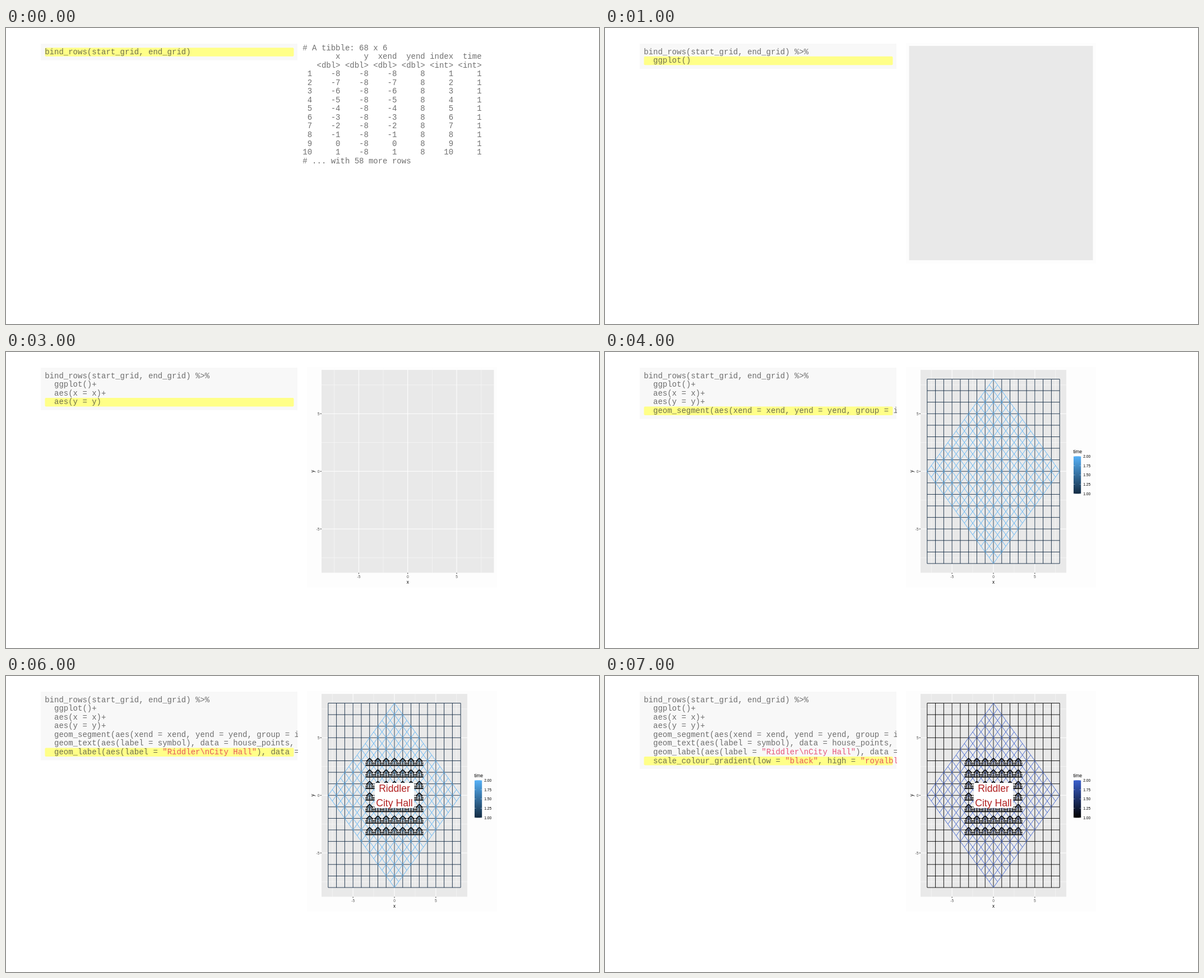
An HTML page that plays this animation: 1058 px wide and 529 px high, repeating every 8000 ms.

```html
<!DOCTYPE html>
<html lang="en">
<head>
<meta charset="utf-8">
<title>Building a plot step by step</title>
<style>
html, body { margin: 0; width: 100%; height: 100%; overflow: hidden; background: #fff; }
svg { display: block; width: 1058px; height: 529px; }
text { font-family: "Liberation Sans", Arial, sans-serif; font-size: 6.7px; fill: #4d4d4d; }
.mono { font: 14px "Liberation Mono", "Courier New", monospace; fill: #333; fill-opacity: .7; white-space: pre; }
.str { fill: #d14; }
.title { font-size: 8.2px; fill: #000; }
.key { fill: #000; }
.hall { font-size: 17.6px; fill: #b22222; }
.mid { text-anchor: middle; }
.end { text-anchor: end; }
</style>
</head>
<body>
<svg id="stage" viewBox="0 0 1058 529"></svg>
<script>
const STEP = 1000, STEPS = 8, ROW = 15.53;
const TOP = 32, BOTTOM = 394.5, RIGHT = 870.5;
const code = [
  'bind_rows(start_grid, end_grid)',
  '  ggplot()',
  '  aes(x = x)',
  '  aes(y = y)',
  '  geom_segment(aes(xend = xend, yend = yend, group = i',
  '  geom_text(aes(label = symbol), data = house_points,',
  '  geom_label(aes(label = "Riddler\\nCity Hall"), data =',
  '  scale_colour_gradient(low = "black", high = "royalbl'
];

const range = (a, b, by = 1) => Array.from({ length: Math.round((b - a) / by) + 1 }, (_, i) => a + i * by);
const escape = s => s.replace(/&/g, '&amp;').replace(/</g, '&lt;').replace(/>/g, '&gt;');
const text = (x, y, cls, s, more = '') => `<text x="${x}" y="${y}" class="${cls}" ${more}>${s}</text>`;
const rect = (x, y, w, h, fill, r = 0) =>
  `<rect x="${x}" y="${y}" width="${w}" height="${h}" fill="${fill}" rx="${r}"/>`;
const lines = (d, color, width) => `<path d="${d}" fill="none" stroke="${color}" stroke-width="${width}"/>`;
const seg = (x1, y1, x2, y2) => `M${x1} ${y1}L${x2} ${y2}`;

function codePanel(step) {
  const rows = code.slice(0, step + 1).map((line, i) => {
    const tail = i === step || i > 3 ? '' : i ? '+' : ' %>%';
    const body = escape(line + tail).replace(/"[^"]*"?/g, '<tspan class="str">$&</tspan>');
    return text(69.2, 46.8 + i * ROW, 'mono', body);
  });
  return rect(62, 28, 458, 14 + (step + 1) * ROW, '#f8f8f8') +
    rect(69.5, 35.3 + step * ROW, 444, ROW, '#ffff88', 2) +
    `<g clip-path="url(#codeClip)">${rows.join('')}</g>`;
}

function table() {
  const row = (n, cells) => String(n).padStart(2) + cells.map(c => ' ' + String(c).padStart(5)).join('');
  const d = '<dbl>', n = '<int>';
  return [
    '# A tibble: 68 x 6',
    row('', ['x', 'y', 'xend', 'yend', 'index', 'time']),
    row('', [d, d, d, d, n, n]),
    ...range(1, 10).map(i => row(i, [i - 9, -8, i - 9, 8, i, 1])),
    '# ... with 58 more rows'
  ].map((s, i) => text(529.3, 39.7 + i * ROW, 'mono', escape(s))).join('');
}

// Panel with gridlines and axes; returns its scales too
function panel(left, right, hasY) {
  const ux = (right - left) / 17.6, uy = (BOTTOM - TOP) / 17.6;
  const cx = (left + right) / 2, cy = (TOP + BOTTOM) / 2;
  const X = v => cx + v * ux, Y = v => cy - v * uy;
  const grid = values => values.map(v => seg(X(v), TOP, X(v), BOTTOM) +
    (hasY ? seg(left, Y(v), right, Y(v)) : '')).join('');
  const breaks = [-5, 0, 5];
  let out = rect(left, TOP, right - left, BOTTOM - TOP, '#e9e9e9') +
    lines(grid([-7.5, -2.5, 2.5, 7.5]), '#fff', 0.45) + lines(grid(breaks), '#fff', 1);
  for (const v of breaks) {
    out += lines(seg(X(v), BOTTOM, X(v), BOTTOM + 2.3), '#333', 0.9) + text(X(v), 403.8, 'mid', v);
    if (hasY) out += lines(seg(left - 2.5, Y(v), left, Y(v)), '#333', 0.9) + text(left - 3.5, Y(v) + 2.4, 'end', v);
  }
  out += text(cx, 413.7, 'title mid', 'x');
  if (hasY) out += text(0, 0, 'title mid', 'y', `transform="translate(549.5 ${cy}) rotate(-90)"`);
  return { X, Y, out };
}

function streets({ X, Y }, low, high) {
  const d = (x1, y1, x2, y2) => seg(X(x1), Y(y1), X(x2), Y(y2));
  const ks = range(-8, 8);
  const square = ks.map(k => d(k, -8, k, 8) + d(-8, k, 8, k)).join('');
  const diamond = ks.map(k => {
    const a = (k - 8) / 2, b = (k + 8) / 2;
    return d(a, b, b, a) + d(a, -b, b, -a);
  }).join('');
  return lines(square, low, 0.9) + lines(diamond, high, 0.9);
}

function legend(low, high) {
  let out = `<linearGradient id="ramp" x2="0" y2="1"><stop stop-color="${high}"/>` +
    `<stop offset="1" stop-color="${low}"/></linearGradient>` +
    text(835.5, 181, 'title', 'time') + rect(836, 186.3, 13.2, 67, 'url(#ramp)');
  range(1, 2, 0.25).forEach((v, i) => {
    const y = 253 - i * 16.63;
    out += lines(seg(836, y, 838.6, y) + seg(846.6, y, 849.2, y), '#fff', 0.4) +
      text(853.3, y + 2.5, 'key', v.toFixed(2));
  });
  return out;
}

function houses({ X, Y }) {
  const house = '<g id="house" stroke="#000" fill="none">' +
    '<path d="M-5.8 -1L0 -6.6L5.8 -1" stroke-width="1.6"/>' +
    '<path d="M-4.2 -2V6.4M4.2 -2V6.4" stroke-width="1.2"/>' +
    '<path d="M-7.2 6.4H7.2" stroke-width="1.5"/>' +
    '<path d="M-7.2 2.2H-4M4 2.2H7.2M-6.5 .6V6.4M6.5 .6V6.4" stroke-width=".8"/>' +
    '<path d="M-1.6 -2.4H1.6V.4H-1.6ZM-1.4 6V2.6H1.4V6" stroke-width=".8"/></g>';
  const places = range(-3, 3).flatMap(y => range(-3, 3).map(x =>
    `<use href="#house" x="${X(x)}" y="${Y(y) + 2.2}"/>`));
  return `<defs>${house}</defs>` + places.join('');
}

function plot(step) {
  if (step === 1) return rect(542.5, TOP, 328, 383, '#e9e9e9');
  if (step === 2) return panel(542.5, RIGHT, false).out;
  if (step === 3) return panel(563, RIGHT, true).out;
  const [low, high] = step === 7 ? ['#000000', '#3a5fcd'] : ['#132b43', '#56b1f7'];
  const p = panel(563, 823, true);
  let out = p.out + streets(p, low, high) + legend(low, high);
  if (step > 4) out += houses(p);
  if (step > 5) out += rect(657.7, 191, 70.6, 45, '#fff', 2.5) +
    text(693, 207.4, 'hall mid', 'Riddler') + text(693, 233, 'hall mid', 'City Hall');
  return out;
}

const stage = document.getElementById('stage');
const clip = '<clipPath id="codeClip"><rect x="62" y="28" width="459" height="200"/></clipPath>';
const paper = rect(537, 26.5, 339, 394, '#fdfdfd');
let shown = -1;

function draw(now) {
  const step = Math.floor(now / STEP) % STEPS;
  if (step !== shown) {
    shown = step;
    stage.innerHTML = clip + codePanel(step) + (step ? paper + plot(step) : table());
  }
  requestAnimationFrame(draw);
}
draw(performance.now());
</script>
</body>
</html>
```
